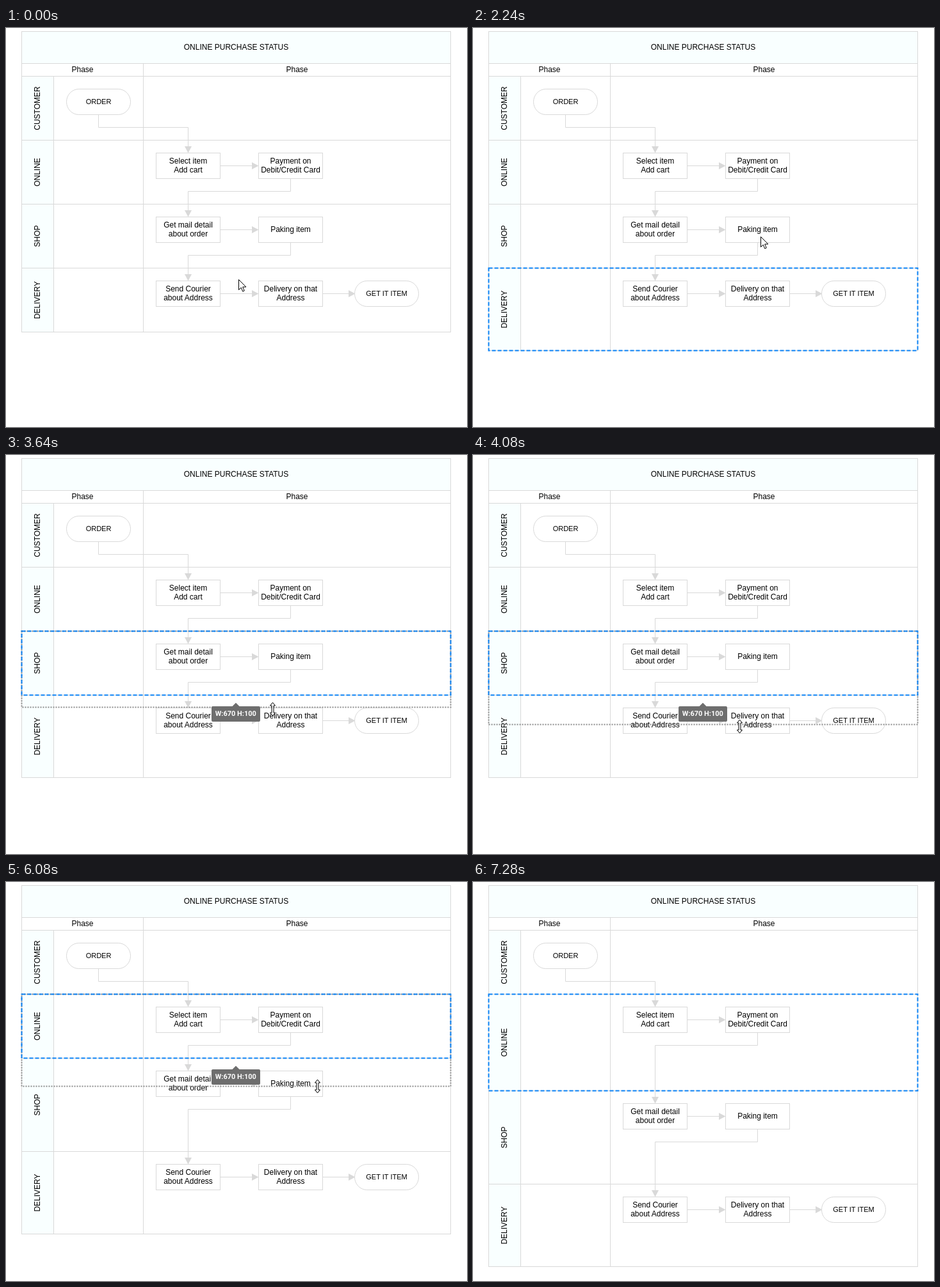
Write an HTML page that moves like this. It is 720x624 px and loops after 7.84 s.

```html
<!DOCTYPE html>
<html lang="en">
<head>
<meta charset="utf-8">
<title>Swimlane resize</title>
<style>
  html, body { margin: 0; width: 100%; height: 100%; overflow: hidden; background: #fff; }
  svg { display: block; width: 720px; height: 624px; }
  text { font: 12px "Liberation Sans", Arial, sans-serif; text-anchor: middle; fill: #000; }
  text.small { font-size: 11px; }
  text.tip { font: 700 11px Roboto, sans-serif; fill: #fff; text-rendering: geometricPrecision; }
  .line { fill: none; stroke: #d9d9d9; }
  .box { fill: #fff; stroke: #d9d9d9; }
  .head { fill: #f9ffff; stroke: #d9d9d9; }
  .arrow { fill: #d9d9d9; }
  .selected { fill: none; stroke: #0b82f5; stroke-width: 2; stroke-dasharray: 6 3; }
  .ghost { fill: none; stroke: #8c8c8c; stroke-width: 2; stroke-dasharray: 2 2; }
  .bubble { fill: #6e6e6e; }
  .cursor { fill: #fff; stroke: #000; stroke-linejoin: round; }
</style>
</head>
<body>
<svg id="stage" viewBox="0 0 720 624"></svg>
<script>
const LOOP = 7840, STEP = 40;
const LEFT = 24.5, RIGHT = 694.5, LABEL = 74.5, PHASE = 214.5, TOP = 75.5, LANE = 100;
const WIDTH = RIGHT - LEFT;
const names = ["CUSTOMER", "ONLINE", "SHOP", "DELIVERY"];
const home = { x: 363, y: 393 };

// A lane is picked, its lower edge is dragged by `grow` and dropped, then the pointer leaves for `next`
const drags = [
  { lane: 3, pick: 160, reach: 400, start: 1160, drop: 1880, leave: 1880, x: 363, grip: 5, grow: 29, next: { x: 452, y: 321 } },
  { lane: 2, pick: 2640, reach: 400, start: 3480, drop: 4360, leave: 4360, x: 416, grip: 2, grow: 46, next: { x: 538, y: 235 } },
  { lane: 1, pick: 5080, reach: 280, start: 5760, drop: 6640, leave: 6880, x: 486, grip: 0, grow: 51, next: { x: 722, y: 481 } }
];

const easeOut = (t, from, length, power) =>
  1 - (1 - Math.min(1, Math.max(0, (t - from) / length))) ** power;
const mix = (a, b, k) => ({ x: a.x + (b.x - a.x) * k, y: a.y + (b.y - a.y) * k });
const dragged = (g, t) => g.grow * easeOut(t, g.start + 60, 420, 2);

function pointerAt(t) {
  return drags.reduce((p, g) => {
    const edge = { x: g.x, y: TOP + LANE * (g.lane + 1) + g.grip + dragged(g, t) };
    p = mix(p, edge, easeOut(t, g.pick, g.reach, 2));
    return g.next.x > 720
      ? mix(p, g.next, easeOut(t, g.leave, 400, 1))
      : mix(p, g.next, easeOut(t, g.leave, 520, 3));
  }, home);
}

const rect = (cls, x, y, w, h, rx = 0, ry = rx) =>
  `<rect class="${cls}" x="${x}" y="${y}" width="${w}" height="${h}" rx="${rx}" ry="${ry}"/>`;
const text = (s, x, y, cls = "") => `<text class="${cls}" x="${x}" y="${y}">${s}</text>`;
const shape = (cls, d) => `<path class="${cls}" d="${d}"/>`;

function box(x, y, ...lines) {
  const first = y + 23.5 - (lines.length - 1) * 7;
  return rect("box", x, y, 100, 40) +
    lines.map((s, i) => text(s, x + 50, first + i * 14)).join("");
}

const pill = (x, y, s) => rect("box", x, y, 100, 40, 19.3, 20) + text(s, x + 50, y + 23.5, "small");

const across = (x0, x1, y) =>
  shape("line", `M${x0} ${y}H${x1 - 10}`) +
  shape("arrow", `M${x1} ${y}l-10.5 -5.5v11z`);

const elbow = (x0, y0, x1, y1) =>
  shape("line", `M${x0} ${y0}v20H${x1}V${y1 - 10}`) +
  shape("arrow", `M${x1} ${y1}l-5.5 -10.5h11z`);

function lanes(tops, heights) {
  const bottom = tops[3] + heights[3];
  let out = rect("head", LEFT, 5.5, WIDTH, 50) + text("ONLINE PURCHASE STATUS", 359.5, 34);
  out += rect("box", LEFT, 55.5, WIDTH, bottom - 55.5);
  out += text("Phase", (LEFT + PHASE) / 2, 69) + text("Phase", (PHASE + RIGHT) / 2, 69);
  names.forEach((name, i) => {
    const y = tops[i], mid = y + heights[i] / 2;
    out += rect("head", LEFT, y, LABEL - LEFT, heights[i]) + shape("line", `M${LABEL} ${y}H${RIGHT}`);
    out += `<g transform="translate(53 ${mid}) rotate(-90)">${text(name, 0, 0)}</g>`;
  });
  return out + shape("line", `M${PHASE} 55.5V${bottom}`);
}

function flow(tops) {
  const [a, b, c, d] = tops.map(y => y + 20);
  return elbow(144.5, a + 40, 284.5, b) +
    elbow(444.5, b + 40, 284.5, c) +
    elbow(444.5, c + 40, 284.5, d) +
    [b, c, d].map(y => across(334.5, 394.5, y + 20)).join("") +
    pill(94.5, a, "ORDER") +
    box(234.5, b, "Select item", "Add cart") +
    box(394.5, b, "Payment on", "Debit/Credit Card") +
    box(234.5, c, "Get mail detail", "about order") +
    box(394.5, c, "Paking item") +
    box(234.5, d, "Send Courier", "about Address") +
    box(394.5, d, "Delivery on that", "Address") +
    pill(544.5, d, "GET IT ITEM") +
    across(494.5, 545.5, d + 20);
}

function tooltip(edge, height) {
  const y = edge + 17.5;
  return shape("bubble", `M359 ${y - 5.5}l6 6h-12z`) + rect("bubble", 321, y, 76, 24, 2) +
    text(`W:${WIDTH} H:${height}`, 358.8, y + 15, "tip");
}

function cursor(t) {
  const p = pointerAt(t);
  const handle = drags.some(g => t >= g.pick + g.reach * 0.8 && t < g.drop);
  const d = handle
    ? "m0 -10.5l4 5h-2.5v11h2.5l-4 5l-4 -5h2.5v-11h-2.5z"
    : "v16l3.7 -3.5l2.6 6l2.5 -1.1l-2.6 -5.9h5.2z";
  return shape("cursor", `M${Math.round(p.x) + 0.5} ${Math.round(p.y) + 0.5}${d}`);
}

function selection(g, t, y, h) {
  const active = t >= g.start && t < g.drop;
  return (active ? rect("ghost", LEFT, y, WIDTH, h + Math.round(dragged(g, t))) : "") +
    rect("selected", LEFT, y, WIDTH, h) +
    (active ? tooltip(y + h, h) : "");
}

function render(t) {
  const heights = names.map((_, i) =>
    drags.reduce((h, g) => g.lane === i && t >= g.drop ? h + g.grow : h, LANE));
  const tops = [TOP];
  for (let i = 0; i < 3; i++) tops.push(tops[i] + heights[i]);
  const current = drags.filter(g => t >= g.pick).pop();
  return lanes(tops, heights) + flow(tops) +
    (current ? selection(current, t, tops[current.lane], heights[current.lane]) : "") +
    cursor(t);
}

const stage = document.getElementById("stage");
const origin = performance.now();
let shown = -1;

function tick() {
  const t = Math.floor(((performance.now() - origin) % LOOP) / STEP) * STEP;
  if (t !== shown) {
    shown = t;
    stage.innerHTML = render(t);
  }
  requestAnimationFrame(tick);
}
tick();
</script>
</body>
</html>
```
